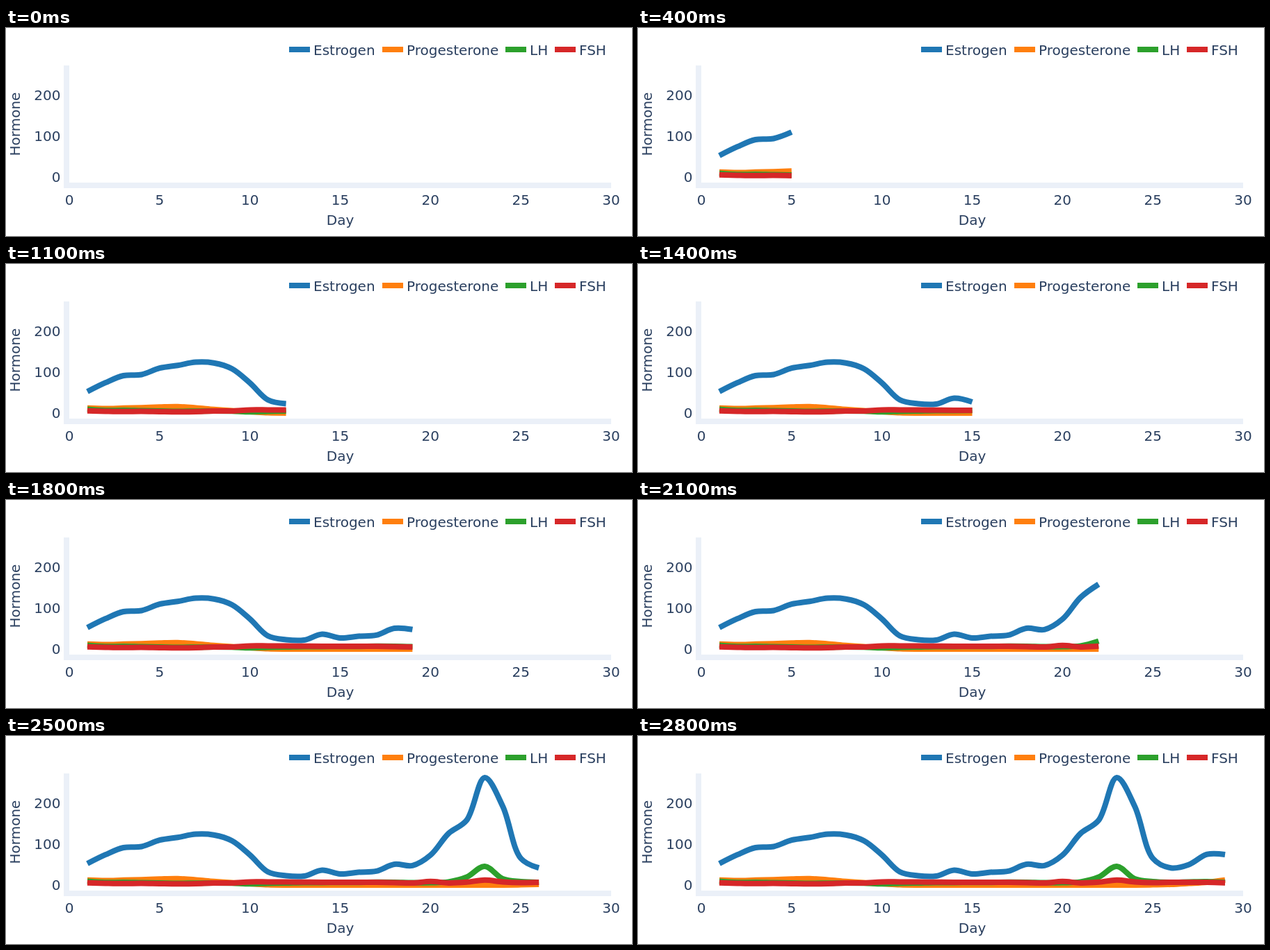
Recreate the animation shown at these times as an HTML page. Size 900 px wide and 300 px high, loop 2.9 s.

```html
<!DOCTYPE html>
<html lang="en">
<head>
<meta charset="utf-8">
<title>Hormones by day</title>
<style>
  html, body { margin: 0; width: 100%; height: 100%; overflow: hidden; background: #fff; }
  svg { display: block; }
  text { font: 20px "DejaVu Sans", sans-serif; fill: #2a3f5f; }
  path { fill: none; stroke-width: 8; stroke-linejoin: round; }
</style>
</head>
<body>
<svg id="chart" width="900" height="300" viewBox="0 0 900 300"></svg>
<script>
const chart = document.getElementById('chart');
const STEP = 100, DAYS = 29;
const dayX = day => 91 + day * 779 / 30;

// Heights are in stage pixels, one per day from day 1.
const series = [
  { name: 'Estrogen', color: '#1f77b4', legendX: 407, heights: [
    184, 171.2, 161, 159.5, 150.2, 146.2, 141.6, 142.7, 151, 171.5,
    196, 201.5, 202, 193.5, 199, 196.5, 194.8, 185, 186.8, 171.8,
    140.5, 121.5, 60, 101.5, 176.5, 190.2, 185.5, 170.7, 171] },
  { name: 'Progesterone', color: '#ff7f0e', legendX: 541, heights: [
    207.8, 208.6, 207.8, 207.2, 206.3, 205.8, 207.4, 209.7, 211.6, 213,
    214.6, ...Array(13).fill(215), 214.6, 214, 212.6, 211, 207.8] },
  { name: 'LH', color: '#2ca02c', legendX: 718, heights: [
    209.5, 211.3, 211, 211.6, 212, 212.5, 212.2, 212, 212.2, 213.2,
    212.4, 212, 211.5, 211.5, 211.2, 211.2, 210.8, 211, 211.6, 211.6,
    210.4, 203.5, 188, 206, 210, 211, 210.4, 210, 211.2] },
  { name: 'FSH', color: '#d62728', legendX: 789, heights: [
    211.8, 212.4, 212.8, 212.6, 213, 213.3, 212.9, 212.1, 211.9, 210.4,
    210.4, 210.5, 210.8, 211, 210.9, 210.9, 211, 211.4, 212, 209.8,
    211.9, 210.8, 207.8, 210.4, 211.5, 211, 211, 211, 211.8] }
];

function add(tag, attrs, content = '') {
  const node = document.createElementNS('http://www.w3.org/2000/svg', tag);
  for (const key in attrs) node.setAttribute(key, attrs[key]);
  node.textContent = content;
  return chart.appendChild(node);
}

const label = (content, x, y, anchor = 'middle', extra = {}) =>
  add('text', { x, y, 'text-anchor': anchor, ...extra }, content);

// Centripetal Catmull-Rom control points before and after p.
function controls(prev, p, next) {
  const a = Math.hypot(prev[0] - p[0], prev[1] - p[1]);
  const b = Math.hypot(next[0] - p[0], next[1] - p[1]);
  const ra = Math.sqrt(a), rb = Math.sqrt(b);
  const tangent = p.map((v, i) => (b * (prev[i] - v) - a * (next[i] - v)) / (3 * (ra + rb)));
  return [p.map((v, i) => v + tangent[i] / rb), p.map((v, i) => v - tangent[i] / ra)];
}

function spline(points) {
  const last = points.length - 1;
  if (last < 1) return '';
  if (last < 2) return `M${points[0]}L${points[1]}`;
  const ctrl = points.map((p, i) => i > 0 && i < last && controls(points[i - 1], p, points[i + 1]));
  let d = `M${points[0]}Q${ctrl[1][0]} ${points[1]}`;
  for (let i = 2; i < last; i++) d += `C${ctrl[i - 1][1]} ${ctrl[i][0]} ${points[i]}`;
  return d + `Q${ctrl[last - 1][1]} ${points[last]}`;
}

add('path', { d: 'M87 54V227H870', stroke: '#ebf0f8', style: 'stroke-linejoin:miter' });
for (let day = 0; day <= 30; day += 5) label(day, dayX(day), 255);
for (let i = 0; i < 3; i++) label(i * 100, 78.5, 222 - i * 59, 'end');
label('Day', 480.5, 284);
label('Hormone', 0, 0, 'middle', { transform: 'translate(20 138.5) rotate(-90)' });

for (const s of series) {
  s.points = s.heights.map((y, i) => [dayX(i + 1), y]);
  s.line = add('path', { stroke: s.color });
  add('path', { d: `M${s.legendX} 31h30`, stroke: s.color });
  label(s.name, s.legendX + 35, 39, 'start');
}

let shown = 0;
function draw() {
  const count = Math.floor(performance.now() / STEP) % DAYS + 1;
  if (count !== shown) {
    shown = count;
    for (const s of series) s.line.setAttribute('d', spline(s.points.slice(0, count)));
  }
  requestAnimationFrame(draw);
}
draw();
</script>
</body>
</html>
```
